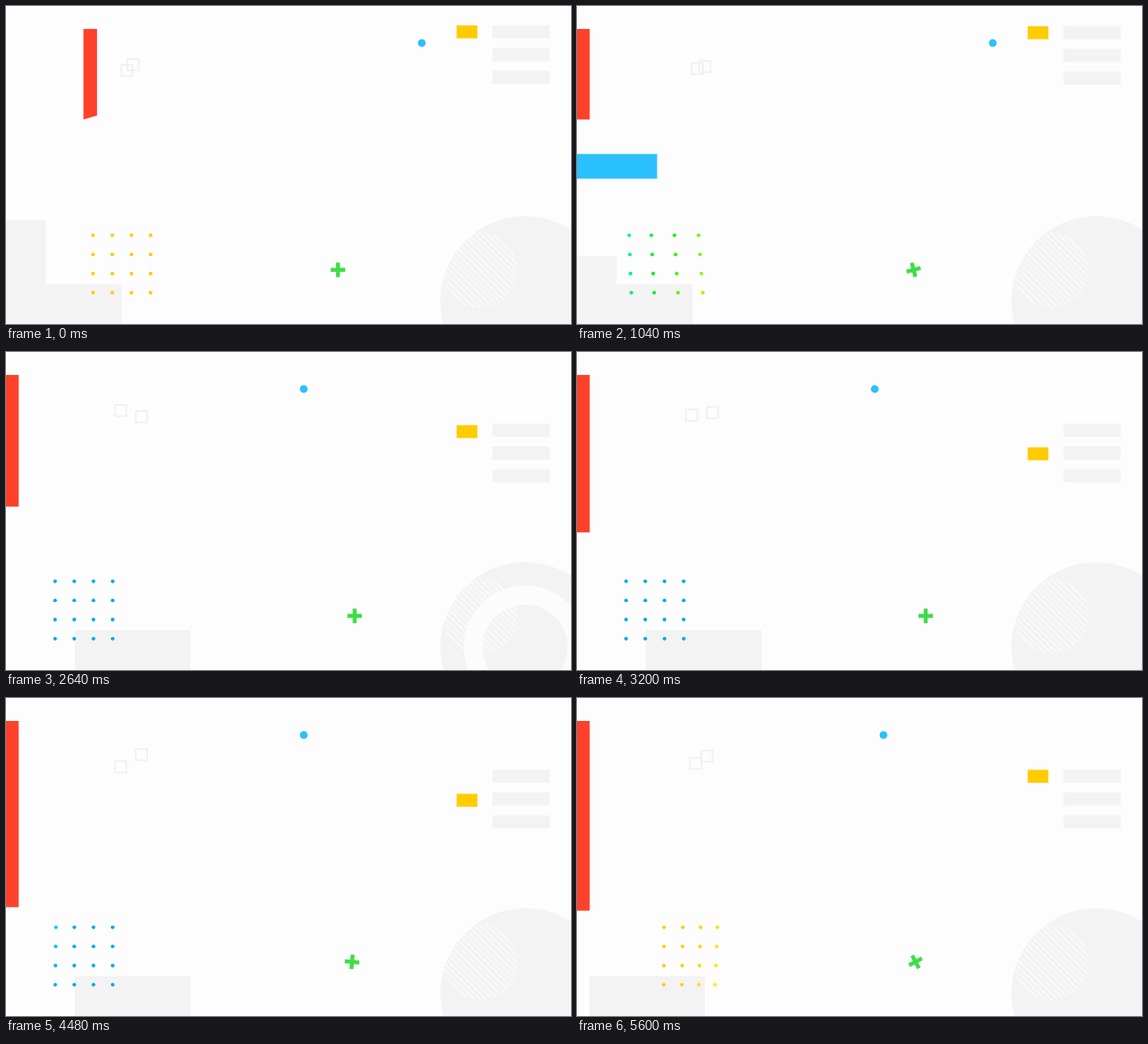
An HTML page with a canvas for the animation above (5.68 s loop, 640 by 360 pixels).

```html
<!DOCTYPE html>
<html lang="en">
<head>
<meta charset="utf-8">
<title>Geometric shapes</title>
<style>
html, body { margin: 0; width: 100%; height: 100%; overflow: hidden; background: #fdfdfd; }
canvas { display: block; }
</style>
</head>
<body>
<canvas id="stage" width="640" height="360"></canvas>
<script>
const ctx = document.getElementById('stage').getContext('2d');
const LOOP = 5680, STEP = 80;
const WHITE = '#fdfdfd', GREY = '#f3f3f3', RED = '#ff412c', YELLOW = '#ffcc00', BLUE = '#2bc0ff', GREEN = '#3fdd48';

const clamp = p => Math.min(1, Math.max(0, p));
const quad = p => p < .5 ? 2 * p * p : 1 - 2 * (1 - p) ** 2;
const cubic = p => p < .5 ? 4 * p ** 3 : 1 - 4 * (1 - p) ** 3;
const ease = (t, start, length, curve = quad) => curve(clamp((t - start) / length));
// 0 to 1 from "out", and 1 to 0 from "back"
const trip = (t, out, back, length, curve) => ease(t, out, length, curve) - ease(t, back, length, curve);

function rect(x, y, w, h, color) {
  ctx.fillStyle = color;
  ctx.fillRect(x, y, w, h);
}

function poly(color, ...points) {
  ctx.fillStyle = color;
  ctx.beginPath();
  for (const [x, y] of points) ctx.lineTo(x, y);
  ctx.fill();
}

function circlePath(x, y, r) {
  ctx.beginPath();
  ctx.arc(x, y, r, 0, 2 * Math.PI);
}

function disc(x, y, r, color) {
  ctx.fillStyle = color;
  circlePath(x, y, r);
  ctx.fill();
}

function drawBlocks(t) {
  const base = 315;
  rect(78 * trip(t, 1750, 4970, 900), base, 131, 45, GREY);
  const height = 72.7 * (1 - ease(t, 350, 1300));
  rect(0, base - height, 45, height, GREY);

  // Second tower loses its right corner, then sinks
  const top = base - 66 * trip(t, 3200, 3980, 500);
  const cut = ease(t, 3640, 520);
  poly(GREY, [164, base], [164, top], [209 - 45 * cut, top],
    [209, Math.min(base, top + 87 * cut)], [209, base]);
}

function drawCircle(t) {
  const x = 588, y = 334, r = 96;
  disc(x, y, r, GREY);

  ctx.save();
  circlePath(537, 299, 43);
  ctx.clip();
  ctx.strokeStyle = WHITE;
  ctx.lineWidth = 1.2;
  ctx.beginPath();
  for (let d = -63; d <= 63; d += 7) {
    ctx.moveTo(487 + d, 249);
    ctx.lineTo(587 + d, 349);
  }
  ctx.stroke();
  ctx.restore();

  const outer = r * ease(t, 2050, 940), inner = r * ease(t, 2170, 940);
  if (outer > inner) {
    ctx.strokeStyle = '#fcfcfc';
    ctx.lineWidth = outer - inner;
    circlePath(x, y, (outer + inner) / 2);
    ctx.stroke();
  }
}

function drawList(t) {
  const gap = 25.7;
  const top = 21.9 + 59.4 * ease(t, 870, 1060, cubic);
  for (let i = 0; i < 3; i++) rect(551, top + i * gap, 65, 14.8, GREY);
  const row = trip(t, 2500, 4640, 580, cubic) + trip(t, 3080, 4040, 580, cubic);
  rect(510.5, top + row * gap, 23.5, 14.7, YELLOW);
}

function drawStrips(t) {
  rect(-300 + 1240 * ease(t, 353, 900), 142.3, 300, 28.2, GREY);
  rect(640 - 840 * ease(t, 518, 680), 167.5, 200, 28, BLUE);
}

function drawBar(t) {
  const left = 87.7 - 88.7 * ease(t, 0, 885), right = left + 15.4;
  const growth = 1 - Math.exp(-((Math.max(0, t - 1400) / 1700) ** 2));
  const bottom = 128.6 + 112.4 * growth;
  const slant = 4.5 * (1 - ease(t, 0, 400));
  poly(RED, [left, 26], [right, 26], [right, bottom - slant], [left, bottom]);
}

function drawSquares(t) {
  const size = 12.8;
  const spread = trip(t, 600, 4400, 2000);
  const swap = trip(t, 650, 2640, 1000);
  const stretch = trip(t, 2640, 4480, 1650);
  ctx.strokeStyle = '#f0f0f0';
  ctx.lineWidth = 1.7;
  ctx.strokeRect(130.5 - 7 * spread, 66.6 - 6.8 * swap + 5 * stretch, size, size);
  ctx.strokeRect(137.6 + 9.5 * spread, 60 + 6.9 * swap - 2.3 * stretch, size, size);
}

function drawDots(t) {
  for (let i = 0; i < 16; i++) {
    const col = Math.floor(i / 4), row = i % 4;
    const p = trip(t - 25 * i, 43, 4346, 1250);
    const hue = 48 + 50 * p + 100 * p ** 4;
    disc(98.6 + 21.75 * col - 43 * p, 259.6 + 21.65 * row, 2.1, `hsl(${hue}, 100%, ${50 - 3 * p}%)`);
  }
}

function drawPlus(t) {
  const long = 16.4, thick = 4.5;
  const slide = ease(t, 0, 2784) - ease(t, 3336, 4073);
  const turns = ease(t, 250, 1200, cubic) + ease(t, 4054, 2550);
  ctx.save();
  ctx.translate(376 + 19 * slide, 298.7);
  ctx.rotate(turns * Math.PI / 2);
  rect(-long / 2, -thick / 2, long, thick, GREEN);
  rect(-thick / 2, -long / 2, thick, long, GREEN);
  ctx.restore();
}

function draw(t) {
  rect(0, 0, 640, 360, WHITE);
  drawBlocks(t);
  drawCircle(t);
  drawList(t);
  drawStrips(t);
  drawBar(t);
  drawSquares(t);
  drawDots(t);
  drawPlus(t);
  disc(471 - 133.7 * trip(t, 1000, 5270, 1250, cubic), 41.9, 4.4, BLUE);
}

const began = performance.now();
function frame() {
  const time = (performance.now() - began) % LOOP;
  draw(Math.floor(time / STEP) * STEP);
  requestAnimationFrame(frame);
}
frame();
</script>
</body>
</html>
```
